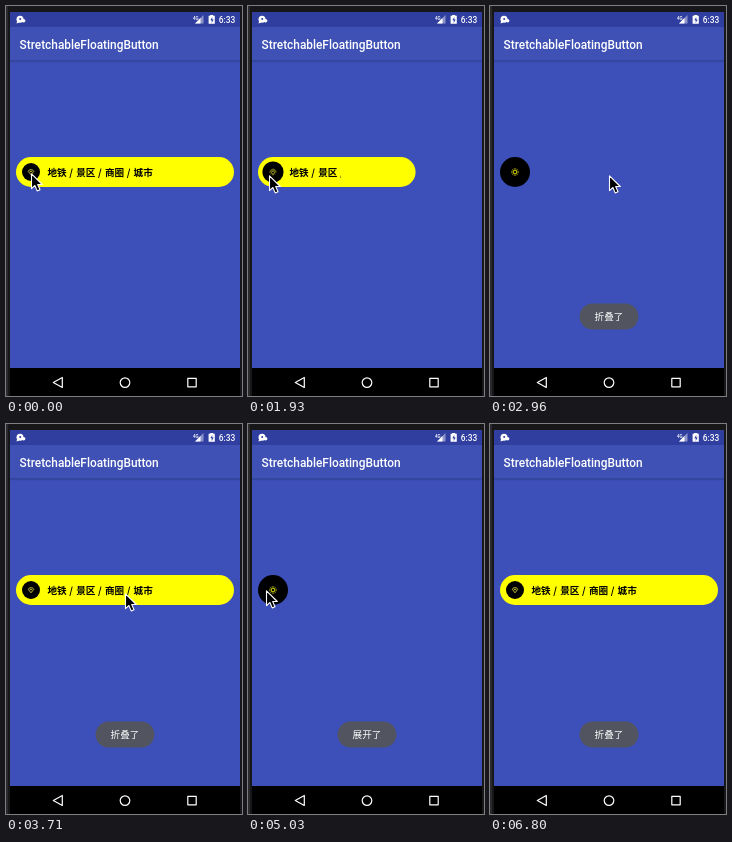
An HTML page for the animation above (7650 ms loop, 236x390 px).

```html
<!DOCTYPE html>
<html lang="zh">
<head>
<meta charset="utf-8">
<title>Stretchable floating button</title>
<style>
  html, body { margin: 0; width: 100%; height: 100%; overflow: hidden; background: #17171a; }
  svg { display: block; width: 236px; height: 390px; }
  .latin { font-family: Roboto, sans-serif; font-weight: 500; fill: #fff; }
  .cjk { font-family: "Noto Sans CJK SC", "Noto Sans CJK", sans-serif; font-size: 9.6px; }
</style>
</head>
<body>
<svg viewBox="0 0 236 390">
  <defs>
    <linearGradient id="shade" x2="0" y2="1">
      <stop stop-color="#2c3a88"/>
      <stop offset="1" stop-color="#3d4fb8" stop-opacity="0"/>
    </linearGradient>
    <clipPath id="labelClip"><rect id="labelBox" x="40" y="151" height="30"/></clipPath>
  </defs>

  <rect width="236" height="390" fill="#17171a"/>
  <rect width="2" height="390" fill="#2b2b2d"/>
  <rect x="4" y="6" width="230" height="356" fill="#3d4fb8"/>
  <rect x="4" y="6" width="230" height="15" fill="#303f9f"/>
  <rect x="4" y="21" width="230" height="34" fill="#3f51b5"/>
  <rect x="4" y="54.5" width="230" height="3" fill="url(#shade)"/>
  <rect x="4" y="362" width="230" height="28"/>

  <!-- status bar -->
  <g fill="#fff">
    <circle cx="14" cy="13.2" r="3.5"/>
    <circle cx="17.6" cy="14.8" r="1.8"/>
    <circle cx="14.2" cy="13" r="1" fill="#303f9f"/>
    <path d="M10.5 17.5l.8-3 2 2z"/>
    <path d="M197.5 9v8.5H189z" opacity=".45"/>
    <path d="M194.5 12v5.5H189z"/>
    <path d="M204.2 9.8V9h3v.8h1.6v8h-6.2v-8z"/>
    <path d="M206.3 11l-2 3.3h1.4v2.6l2-3.4h-1.4z" fill="#303f9f"/>
  </g>
  <text class="latin" x="187" y="13.5" font-size="4.6">4G</text>
  <text class="latin" x="229.3" y="17" font-size="8.4" text-anchor="end">6:33</text>
  <text class="latin" x="13.6" y="42.5" font-size="11.86">StretchableFloatingButton</text>

  <!-- navigation bar -->
  <g fill="none" stroke="#fff" stroke-width="1.2" stroke-linejoin="round">
    <path d="M56.3 371.5v10l-9-5z"/>
    <circle cx="119" cy="376.6" r="4.8"/>
    <rect x="181.8" y="372.4" width="8.4" height="8.4"/>
  </g>

  <!-- stretchable button -->
  <rect id="pill" x="10" y="151" height="30" rx="15" fill="#ff0"/>
  <g clip-path="url(#labelClip)">
    <text id="label" class="cjk" y="170" font-weight="700"></text>
  </g>
  <circle id="knob" cx="25" cy="166"/>
  <g id="sun" fill="none" stroke="#e8e800">
    <circle cx="25" cy="166" r="1.9"/>
    <circle cx="25" cy="166" r="3.3" pathLength="16" stroke-dasharray="1 1" stroke-dashoffset=".5"/>
  </g>
  <path id="gem" d="M23.5 163.8h3l1.2 1.6-2.7 3.4-2.7-3.4zM23.8 165.6h2.4" fill="none" stroke="#d4d440" stroke-width=".9"/>

  <g id="toast">
    <rect x="89.6" y="297.5" width="58.8" height="26" rx="13" fill="#52555f"/>
    <text id="message" class="cjk" x="119" y="314.3" text-anchor="middle" fill="#fff"></text>
  </g>

  <path id="cursor" d="M1.5 .8V15.6L4.9 12.5 7.2 17.9 10 16.7 7.7 11.5H12.3Z" stroke="#fff" stroke-width="1.1" stroke-linejoin="round"/>
</svg>

<script>
const LOOP = 7650;
const REFRESH = 148;          // the picture is held between refreshes
const taps = [1871, 3482, 4888, 6181];   // alternately fold and unfold
const TAP_TIME = 140;
const TOAST_START = 2300, TOAST_TIME = 1950;

const $ = id => document.getElementById(id);
const set = (id, attrs) => {
  for (const name in attrs) $(id).setAttribute(name, attrs[name]);
};

// 0 before `from`, 1 after `to`, smooth in between
function ease(t, from, to) {
  const x = Math.min(1, Math.max(0, (t - from) / (to - from)));
  return x * x * (3 - 2 * x);
}

function pointer(t) {
  const reach = ease(t, 1332, 1628);
  const toLabel = ease(t, 2150, 2900);
  const back = ease(t, 4000, 4736);
  const away = ease(t, 5330, 5920);
  const leave = ease(t, 6520, 6660);
  return {
    x: 24 + ease(t, 0, REFRESH) - 5 * reach + 98 * toLabel - 101 * back + 125 * away + 5 * leave,
    y: 167 + 2 * reach - 3 * back - 6 * Math.sin(Math.PI * back) + 17 * leave
  };
}

$('label').innerHTML = ['地铁', '景区', '商圈', '城市'].map((word, i) => {
  const x = 41.5 + 28.7 * i;
  return (i ? `<tspan x="${x - 6.9}">/</tspan>` : '') + `<tspan x="${x}">${word}</tspan>`;
}).join('');

function draw(time) {
  const t = Math.floor((time + 8) / REFRESH) * REFRESH;

  const open = taps.reduce((sum, tap, i) =>
    sum + (i % 2 ? 1 : -1) * ease(t, tap, tap + TAP_TIME), 1);
  const width = 30 + 188 * open;
  set('pill', { width, opacity: open > 0 ? 1 : 0 });
  set('labelBox', { width: Math.max(0, width - 105) });
  set('knob', { r: 15 - 6 * Math.pow(Math.max(0, open), .8) });
  set('sun', { opacity: 1 - open });
  set('gem', { opacity: open });

  const { x, y } = pointer(t);
  set('cursor', { transform: `translate(${x} ${y})`, opacity: t <= 6660 ? 1 : 0 });

  const turn = Math.floor((t - TOAST_START) / TOAST_TIME);
  set('toast', { opacity: ease(t, TOAST_START - 100, TOAST_START + 220) });
  $('message').textContent = turn === 1 ? '展开了' : '折叠了';
}

const start = performance.now();
function frame() {
  draw((performance.now() - start) % LOOP);
  requestAnimationFrame(frame);
}
frame();
</script>
</body>
</html>
```
